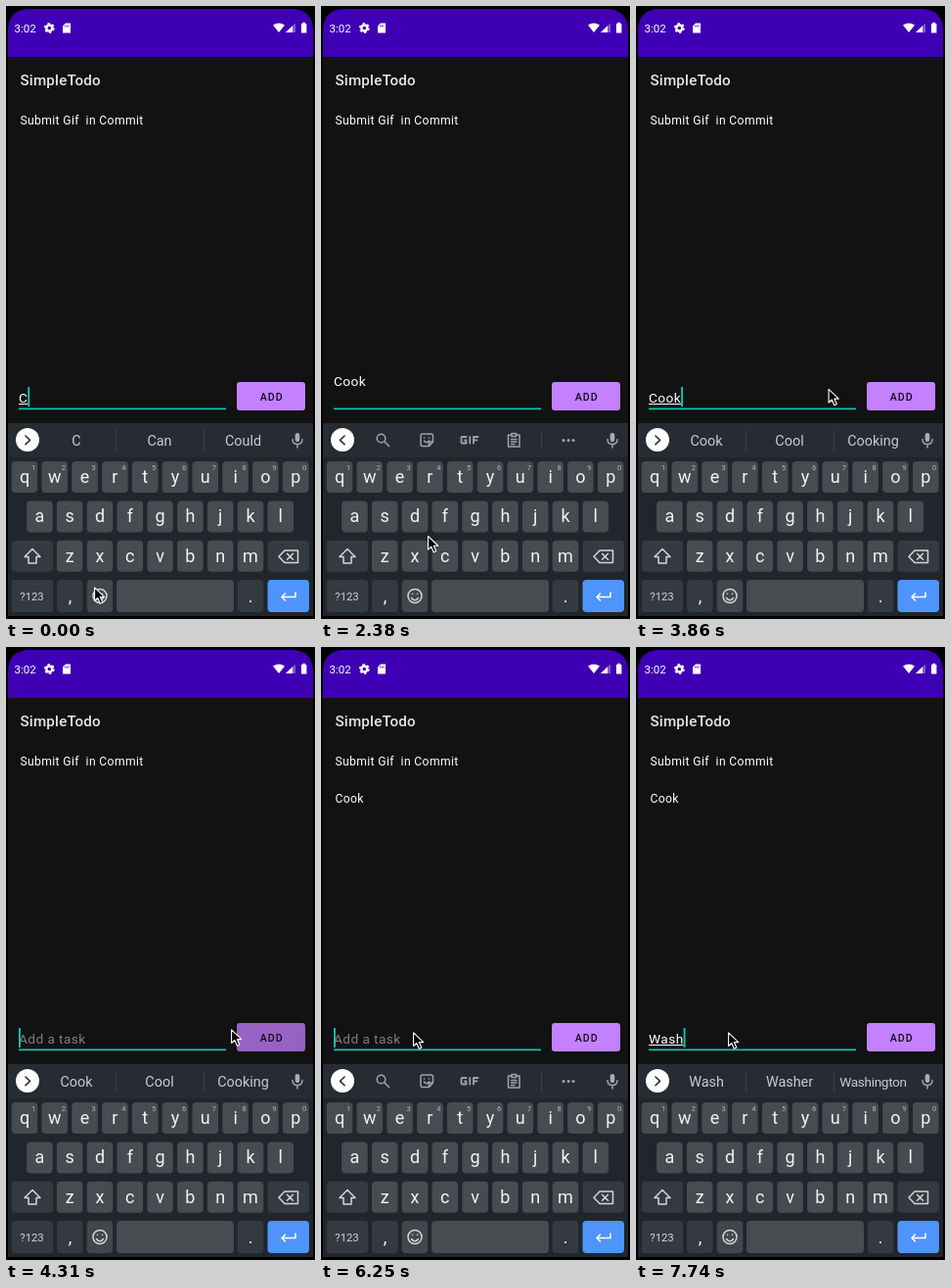
Write an HTML page that moves like this. It is 316 by 626 pixels and loops after 8000 ms.

```html
<!DOCTYPE html>
<html lang="en">
<head>
<meta charset="utf-8">
<title>SimpleTodo</title>
<style>
  html, body { margin: 0; width: 100%; height: 100%; overflow: hidden; background: #000; }
  svg { display: block; width: 100%; height: 100%; }
  text { font-family: Roboto, "Noto Sans", sans-serif; fill: #fff; }
  .mid { text-anchor: middle; }
  .item { font-size: 12.15px; letter-spacing: .36px; }
  .field { font-size: 13.66px; letter-spacing: .43px; }
  .sug { font-size: 14.4px; fill: #c8cbce; text-anchor: middle; }
  .key { font-size: 18px; fill: #f1f3f4; text-anchor: middle; }
  .digit { font-size: 7.5px; fill: #b4b8bb; text-anchor: middle; }
  .line { fill: none; stroke: #9fa4a8; stroke-width: 1.5; stroke-linejoin: round; stroke-linecap: round; }
  .light { stroke: #d3d6d8; }
</style>
</head>
<body>
<svg viewBox="0 0 316 626" preserveAspectRatio="none">
  <path fill="#121212" d="M2 26Q2 3 25 3H291Q314 3 314 26V623H2Z"/>
  <path fill="#3f00b5" d="M2 52V26Q2 3 25 3H291Q314 3 314 26V52Z"/>

  <!-- status bar -->
  <text x="8.5" y="27" font-size="11.5">3:02</text>
  <circle cx="44.3" cy="22.5" r="3" fill="none" stroke="#fff" stroke-width="2.4"/>
  <circle cx="44.3" cy="22.5" r="4.6" fill="none" stroke="#fff" stroke-width="1.6" stroke-dasharray="2.4 2.417"/>
  <path fill="#fff" d="M61 17.500H66V27.500H58V20.500Z"/>
  <path stroke="#3f00b5" stroke-width=".8" d="M60.700 19.500v2M62.400 19.500v2M64.100 19.500v2"/>
  <path fill="#fff" d="M273 19.500Q279 15.500 285 19.500L279 27Z"/>
  <path fill="#fff" fill-opacity=".35" d="M286 27L296 17.500V27Z"/>
  <path fill="#fff" d="M286 27L293 20.300V27Z"/>
  <path fill="#fff" d="M302 18h1.300v-1.200h2.800V18h1.300v9.500H302Z"/>

  <text x="14.500" y="81" font-size="15.2" font-weight="500" letter-spacing=".19" style="fill:#e6e6e6">SimpleTodo</text>
  <text class="item" x="14.500" y="121">Submit Gif&#160; in Commit</text>
  <text class="item" id="added" x="14.500" y="159">Cook</text>

  <!-- entry row -->
  <text class="field" id="hint" x="13" y="405" style="fill:#7d7d7d">Add a task</text>
  <text class="field" id="entry" x="13" y="405"></text>
  <rect id="under" x="13" y="406" height="1" fill="#fff"/>
  <rect x="13" y="410.500" width="212" height="1.700" fill="#10c4b3"/>
  <rect id="caret" width="1.900" fill="#10c4b3"/>
  <rect id="button" x="236" y="384" width="70" height="29" rx="3"/>
  <text class="mid" x="271.700" y="402.800" font-size="10.65" font-weight="500" letter-spacing=".95" style="fill:#120b18">ADD</text>

  <!-- keyboard -->
  <rect x="2" y="426" width="312" height="197" fill="#20262b"/>
  <rect x="2" y="426" width="312" height="35" fill="#262c32"/>
  <circle cx="22" cy="443" r="12" fill="#fff"/>
  <path id="chevron" class="line" style="stroke:#33383c;stroke-width:1.7"/>
  <g id="words">
    <path stroke="#3b4248" d="M112.500 433V454M202.500 433V454"/>
    <text class="sug" x="72" y="448.700"></text>
    <text class="sug" x="157" y="448.700"></text>
    <text class="sug" x="242.500" y="448.700"></text>
  </g>
  <g id="tools" class="line">
    <circle cx="61.500" cy="441.500" r="4.300"/>
    <path d="M65 445L69.500 449.500"/>
    <path d="M104 437H112.500Q114.500 437 114.500 439V445L110.500 449.500H104Q102 449.500 102 447.500V439Q102 437 104 437ZM114 445H110.500V449M105.500 444Q108 447.500 110.500 444M105.500 441h.1M110.500 441h.1"/>
    <path d="M148.500 440H144.500Q143.500 440 143.500 441V445.500Q143.500 446.500 144.500 446.500H148.500V443.500H147M152.300 440V446.500M156 446.500V440H160.500M156 443.300H159.500" stroke-width="1.800"/>
    <path d="M195 438H191.500V450H203V438H199.500M195 436.500H199.500V439.500H195ZM194.500 442.500H200M194.500 445H200M194.500 447.500H198"/>
    <path d="M225.500 434V453" style="stroke:#3b4248;stroke-width:1"/>
    <path d="M248 443.500h.1M253 443.500h.1M258 443.500h.1" style="stroke-width:3"/>
  </g>
  <rect x="295.700" y="436" width="4.600" height="9" rx="2.300" fill="#a9aeb2"/>
  <path class="line" d="M293 442.500Q293 447.500 298 447.500T303 442.500M298 448V451"/>
  <g id="keys"></g>
  <path class="line light" d="M27 554.500L35 562.500H31V569H23V562.500H19Z"/>
  <path class="line light" d="M285 556H298.500V568.500H285L279 562.200ZM287.500 559.300L293.500 565.300M293.500 559.300L287.500 565.300"/>
  <circle class="line light" cx="96" cy="602.500" r="7"/>
  <path class="line light" d="M92.500 604.500Q96 609 99.500 604.500M93.500 600.300h.1M98.500 600.300h.1"/>
  <path class="line" style="stroke:#fff" d="M296 599V603.500H282M285.500 600L282 603.500L285.500 607"/>

  <path id="pointer" fill="#000" stroke="#fff" stroke-width="1.100" stroke-linejoin="round"
    d="M.6 .8V14.500L3.800 11.500L6.300 17.200L8.800 16.100L6.300 10.600H10.800Z"/>
</svg>

<script>
const $ = id => document.getElementById(id);
const LOOP = 8000;

// Keyboard layout
const DARK = '#343b40', LIGHT = '#464c4f', PITCH = 30.8;
let keys = '';
const rect = (x, y, w, fill, h = 32) =>
  keys += `<rect x="${x}" y="${y}" width="${w}" height="${h}" rx="4" fill="${fill}"/>`;
const label = (s, x, y, cls = 'key', extra = '') =>
  keys += `<text class="${cls}" x="${x}" y="${y}" ${extra}>${s}</text>`;

[['qwertyuiop', 19, 465, 487], ['asdfghjkl', 34.4, 505.5, 527], ['zxcvbnm', 65.2, 545.7, 567.5]]
  .forEach(([row, x0, top, base], r) => [...row].forEach((c, i) => {
    const x = x0 + i * PITCH;
    rect(x - 13.3, top, 26.6, LIGHT);
    label(c, x, base);
    if (!r) label((i + 1) % 10, x + 9, 474, 'digit');
  }));
rect(5.7, 545.7, 42.5, DARK);
rect(267.5, 545.7, 42.5, DARK);
[[5.7, 42.5, DARK], [52, 26.6, DARK], [82.7, 26.6, '#41474a'], [113, 120, LIGHT],
 [236.7, 26.6, DARK], [267.5, 42.5, '#4e94fb']].forEach(([x, w, fill]) => rect(x, 586, w, fill, 33));
label('?123', 26.5, 607, 'key', 'style="font-size:11.3px;fill:#d3d6d8"');
label(',', 65.5, 609);
label('.', 250, 609);
$('keys').innerHTML = keys;

// Text states: [time, typed text, underlined letters, suggestions ('' shows the tools)]
const typing = [
  [0, 'C', 1, 'C Can Could'],
  [600, 'Co', 1, 'C Can Could'],
  [745, 'Co', 2, 'Co Could Come'],
  [890, 'Coo', 2, 'Co Could Come'],
  [1040, 'Cook', 3, 'Coo Cool Cook'],
  [1340, 'Cook', 4, 'Cook Cool Cooking'],
  [1630, 'Cook\n', 0, 'Cook Cool Cooking'],
  [1780, 'Cook\n', 0, ''],
  [3270, 'Cook', 4, 'Cook Cool Cooking'],
  [4310, '', 0, 'Cook Cool Cooking'],
  [4450, '', 0, ''],
  [6690, 'W', 0, ''],
  [6840, 'Wa', 2, 'W We What'],
  [6990, 'Was', 2, 'W We What'],
  [7140, 'Was', 3, 'Was Wash Want'],
  [7590, 'Wash', 3, 'Was Wash Want'],
  [7740, 'Wash', 4, 'Wash Washer Washington']
];

// Times at which the caret is hidden
const blinks = [[2230, 2670], [3870, 4310], [4750, 5200], [5800, 6250]];

// Pointer moves: [first step, steps, x, y]
const moves = [
  [0, 1, 90, 593], [2230, 6, 163, 391], [3570, 4, 230, 390],
  [4450, 2, 115, 418], [4750, 2, 108, 408.5], [5350, 2, 94, 393]
];
const STEP = 147.5;

const within = (t, [a, b]) => t >= a && t < b;
const ease = p => p * p * (3 - 2 * p);

function pointerAt(t) {
  const i = moves.findLastIndex(m => t >= m[0]);
  const [start, steps, x, y] = moves[i];
  if (!i) return [x, y];
  const p = ease(Math.min(1, (Math.floor((t - start) / STEP) + 1) / steps));
  const [, , px, py] = moves[i - 1];
  return [px + (x - px) * p, py + (y - py) * p];
}

const words = [...$('words').querySelectorAll('text')];
const show = (id, on) => $(id).setAttribute('visibility', on ? 'visible' : 'hidden');
const set = (id, attrs) => {
  for (const k in attrs) $(id).setAttribute(k, attrs[k]);
};

let last = null;
function showTyping(state) {
  if (state === last) return;
  last = state;
  const [, text, marked, list] = state;
  const twoLines = text.endsWith('\n');
  const entry = $('entry');
  entry.textContent = text.trim();
  set('entry', { y: twoLines ? 388 : 405 });
  const width = n => n ? entry.getSubStringLength(0, n) : 0;
  set('under', { width: width(marked) });
  set('caret', {
    x: 13 + (twoLines ? 0 : width(text.length)),
    y: twoLines ? 391 : 389,
    height: twoLines ? 18 : 20
  });
  show('hint', !text);
  show('words', list);
  show('tools', !list);
  set('chevron', { d: list ? 'M20 439L24.500 443.300L20 447.600' : 'M24 439L19.500 443.300L24 447.600' });
  list.split(' ').forEach((w, i) => {
    words[i].textContent = w;
    const long = w.length > 8;
    words[i].style.fontSize = long ? '13.6px' : '';
    words[i].style.letterSpacing = long ? '-.33px' : '';
  });
}

function render(t) {
  showTyping(typing.findLast(s => t >= s[0]));
  show('caret', !blinks.some(b => within(t, b)));
  show('added', t >= 4450);
  set('button', { fill: within(t, [4160, 4450]) ? '#9762c4' : '#c381ff' });
  set('pointer', { transform: `translate(${pointerAt(t)})` });
}

let begin;
function tick(now) {
  begin ??= now;
  render((now - begin) % LOOP);
  requestAnimationFrame(tick);
}
render(0);
requestAnimationFrame(tick);
</script>
</body>
</html>
```
